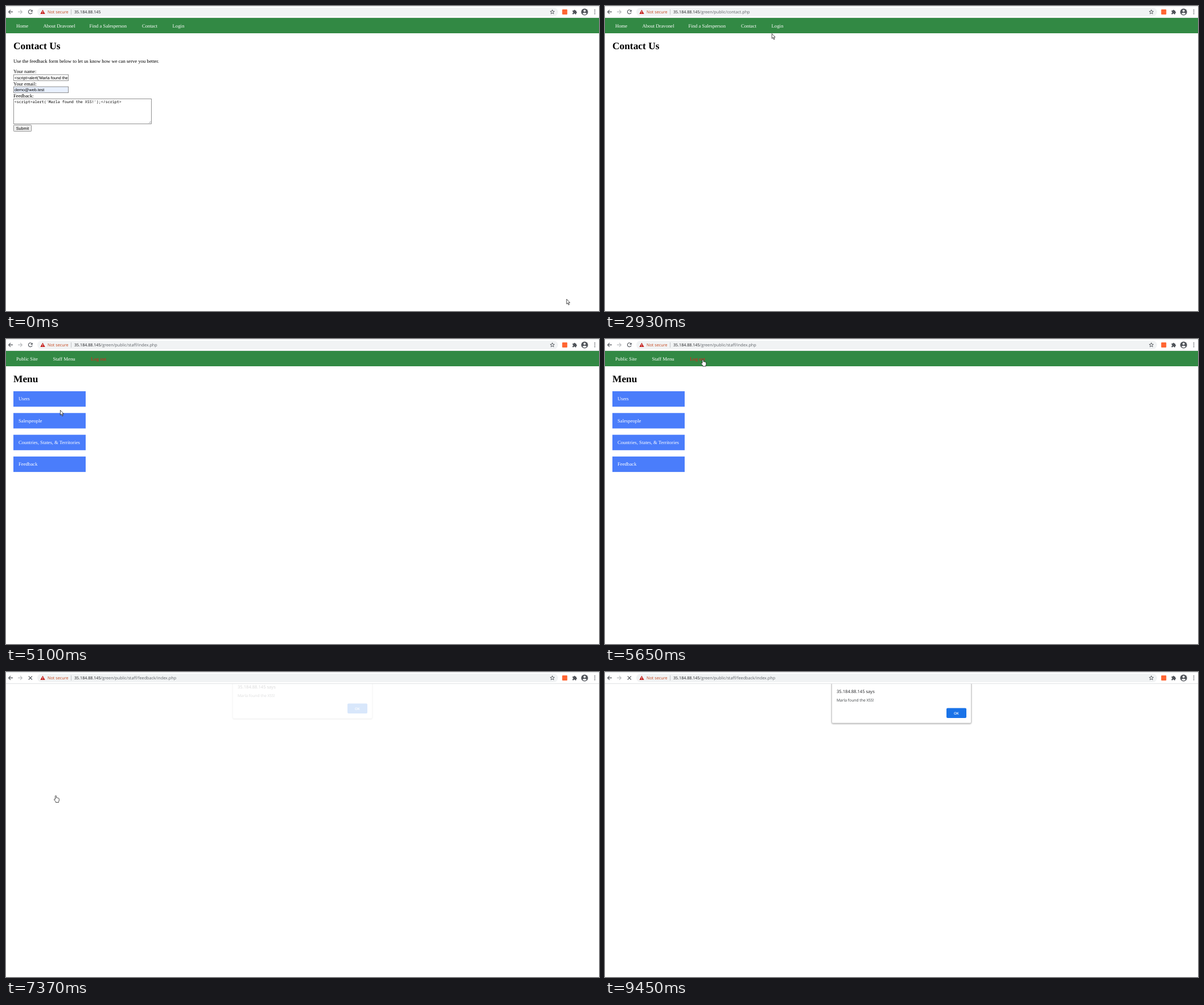
These frames come from a looping animation (1042x537 px, 9.53 s). An HTML page:

```html
<!DOCTYPE html>
<html lang="en">
<head>
<meta charset="utf-8">
<title>Feedback form demo</title>
<style>
  html, body { margin: 0; width: 100%; height: 100%; overflow: hidden; background: #fff; }
  svg { display: block; width: 1042px; height: 537px; }
  text { font: 8.68px "Liberation Serif", serif; text-rendering: geometricPrecision; white-space: pre; }
  .ui { font-family: "Open Sans", "Noto Sans", sans-serif; font-size: 7.25px; }
  .field { font: 7.24px "Liberation Sans", sans-serif; }
  .code { font: 6.68px "Noto Sans Mono", monospace; }
  .title { font-size: 17.37px; font-weight: bold; }
  .bar { fill: #328944; }
  .light text { fill: #fff; }
  .light .logout { fill: #e81c1c; }
  .icon { fill: none; stroke: #50545a; stroke-width: 1.1; }
  .solid { fill: #50545a; }
  .link { fill: none; }
  .box { fill: #fff; stroke: #767676; stroke-width: .8; }
  .autofill { fill: #e8f0fe; }
  .button { fill: #efefef; }
  .box.hover { stroke: #4f4f4f; }
  .button.hover { fill: #e3e3e3; }
  .button.pressed { fill: #f5f5f5; stroke: #8d8d8d; }
  .tile { fill: #4a7dfb; }
  .tile.hover { fill: #4070e1; }
  #ok { fill: #1a73e8; }
  #ok.hover { fill: #2b7de9; }
</style>
</head>
<body>
<svg viewBox="0 0 1042 537">
  <defs>
    <clipPath id="nameClip"><rect x="14" y="121" width="94.5" height="10"/></clipPath>
    <filter id="shadow" x="-5%" y="-10%" width="110%" height="130%">
      <feDropShadow dx="0" dy="1" stdDeviation="1.2" flood-opacity=".4"/>
    </filter>
  </defs>
  <rect width="1042" height="537" fill="#fff"/>

  <g id="contact">
    <rect class="bar" y="21" width="1042" height="27"/>
    <g class="light">
      <text x="18" y="38">Home</text>
      <text x="65.5" y="38">About Dravonel</text>
      <text x="146.5" y="38">Find a Salesperson</text>
      <text x="239" y="38">Contact</text>
      <text x="292.5" y="38">Login</text>
    </g>
    <rect class="link" data-cursor="hand" x="234" y="21" width="38" height="27"/>
    <rect class="link" data-cursor="hand" x="287" y="21" width="32" height="27"/>
    <text class="title" x="13" y="76">Contact Us</text>
    <g id="form">
      <text x="13" y="99.7">Use the feedback form below to let us know how we can serve you better.</text>
      <text x="13" y="118.3">Your name:</text>
      <rect class="box" data-cursor="beam" x="13.4" y="120.9" width="96.2" height="10.6"/>
      <text class="field" x="15" y="128.8" clip-path="url(#nameClip)">&lt;script&gt;alert('Marla found the XSS!');&lt;/script&gt;</text>
      <text x="13" y="139.6">Your email:</text>
      <rect class="box autofill" data-cursor="beam" x="13.4" y="142.1" width="96.2" height="10.6"/>
      <text class="field" x="15" y="150">demo@web.test</text>
      <text x="13" y="160.8">Feedback:</text>
      <rect class="box" data-cursor="beam" x="13.4" y="163.4" width="242.2" height="44"/>
      <path class="icon" style="stroke-width:.5" d="M251 206.3l3.6-3.6M253 206.3l1.6-1.6"/>
      <text class="code" x="14.7" y="171.3">&lt;script&gt;alert('Marla found the XSS!');&lt;/script&gt;</text>
      <rect id="submit" class="box button" data-cursor="arrow" x="13.4" y="209.6" width="31.2" height="11" rx="1"/>
      <text class="field" x="29" y="217.7" text-anchor="middle">Submit</text>
    </g>
  </g>

  <g id="staff" class="light">
    <rect class="bar" y="21" width="1042" height="27"/>
    <text x="18" y="38">Public Site</text>
    <text x="82.5" y="38">Staff Menu</text>
    <text class="logout" x="149" y="38">Log out</text>
    <rect class="link" data-cursor="hand" x="144" y="21" width="38" height="27"/>
    <text class="title" x="13" y="76" style="fill:#000">Menu</text>
  </g>

  <g id="dialog">
    <rect x="398.5" y="18.5" width="245" height="71.5" rx="2" fill="#fff" stroke="#b5b5b5" stroke-width=".6" filter="url(#shadow)"/>
    <text class="ui" x="407" y="36.6" style="font-size:7.6px" fill="#202124">35.184.88.145 says</text>
    <text class="ui" x="407" y="52" style="font-size:6.75px" fill="#3c4043">Marla found the XSS!</text>
    <rect id="ok" x="600" y="63.5" width="35" height="17.5" rx="2"/>
    <text class="ui" x="617.3" y="74.5" text-anchor="middle" style="font-size:6.2px;font-weight:600" fill="#fff">OK</text>
  </g>

  <g id="toolbar">
    <rect width="1042" height="20.5" fill="#fff"/>
    <path d="M0 .5H1042" stroke="#dfe1e4"/>
    <path d="M0 20.5H1042" stroke="#d9dbde" stroke-width=".8"/>
    <rect x="55" y="3" width="915" height="15" rx="7.5" fill="#f1f3f4"/>
    <path class="icon" d="M12 10.4H4.8M8 7L4.6 10.4 8 13.8"/>
    <path class="icon" style="stroke:#b7babd" d="M21 10.4H28.2M25 7L28.4 10.4 25 13.8"/>
    <g id="reload">
      <path class="icon" d="M45.6 8.1A3.5 3.5 0 1 0 46.2 11.4"/>
      <path class="solid" d="M46.7 6.4V10H43.1Z"/>
    </g>
    <path id="stop" class="icon" d="M39.7 7.3L45.9 13.5M45.9 7.3L39.7 13.5"/>
    <path d="M64.5 6.5L68.7 14H60.3Z" fill="#c5221f"/>
    <path d="M64.5 9V11.4M64.5 12.1V13" stroke="#fff" stroke-width=".8"/>
    <text class="ui" x="73" y="13" fill="#c5481f">Not secure</text>
    <path d="M114.5 6V15" stroke="#b5b8bc" stroke-width=".8"/>
    <text class="ui" x="120" y="13" fill="#202124" style="font-size:7.15px">35.184.88.145</text>
    <text class="ui" id="path" x="166.6" y="13" fill="#5f6368"></text>
    <path class="icon" style="stroke-width:.9" d="M960 6.7L961 9.2 963.7 9.4 961.6 11.1 962.3 13.8 960 12.3 957.7 13.8 958.4 11.1 956.3 9.4 959 9.2Z"/>
    <rect x="977.3" y="6" width="9" height="9" rx="1" fill="#ff6633"/>
    <path class="solid" d="M995.5 8H997.6A1.3 1.3 0 0 1 1000.2 8H1002V10A1.3 1.3 0 0 1 1002 12.6V14.4H999.9A1.2 1.2 0 0 0 997.5 14.4H995.5V12.3A1.2 1.2 0 0 0 995.5 9.9Z"/>
    <circle class="solid" cx="1016.7" cy="10.4" r="6"/>
    <circle cx="1016.7" cy="8.4" r="1.9" fill="#fff"/>
    <path d="M1012.9 13.3Q1016.7 10 1020.5 13.3 1016.7 17 1012.9 13.3Z" fill="#fff"/>
    <g class="solid">
      <circle cx="1034.6" cy="7.2" r=".9"/><circle cx="1034.6" cy="10.4" r=".9"/><circle cx="1034.6" cy="13.6" r=".9"/>
    </g>
  </g>

  <g id="cursor" fill="#fff" stroke="#111" stroke-width=".75" stroke-linejoin="round">
    <path id="arrow" d="M.3 .4V9L2.2 7.2 3.7 10.6 5.1 10 3.6 6.7H6.2Z"/>
    <path id="hand" d="M-1 7V1.2Q0 -.3 1 1.2V4.4Q2 3.7 2.7 4.7 3.7 4.2 4.3 5.2 5.7 4.9 5.8 6.4V9Q5.8 10.4 4.9 11.2V12.6H-.1V11.4L-2.9 7.9Q-3 6.2 -1 7Z"/>
    <path id="beam" fill="none" d="M-1.6 -4.5H-.4L0 -4 .4 -4.5H1.6M0 -4V4M-1.6 4.5H-.4L0 4 .4 4.5H1.6"/>
  </g>
</svg>
<script>
const LOOP = 9530;
const $ = id => document.getElementById(id);
const show = (id, on) => { $(id).style.display = on ? "" : "none"; };
const between = (t, a, b) => t >= a && t < b;

["Users", "Salespeople", "Countries, States, &amp; Territories", "Feedback"].forEach((label, i) => {
  const y = 92 + i * 38.3;
  $("staff").insertAdjacentHTML("beforeend",
    `<rect class="tile" data-cursor="hand" x="13" y="${y}" width="127" height="27.2"/>
     <text x="22" y="${y + 16.4}">${label}</text>`);
});

// Pointer tracks: time, x, y. The pointer is off stage between tracks.
const tracks = [
  [[0, 988, 517], [70, 760, 425], [140, 420, 280], [210, 205, 190], [520, 205, 190],
   [750, 150, 200], [950, 60, 213], [1130, 28, 217], [1210, 28, 217], [1280, 27.5, 212.5],
   [2150, 27.5, 212.5], [2300, 28.5, 214], [2400, 28.5, 214], [2620, 120, 150], [2850, 260, 65],
   [3000, 321, 34], [3160, 304, 35], [3310, 303, 33], [3940, 303, 33]],
  [[4730, -6, 187], [4870, 25, 172], [5150, 110, 115], [5400, 189, 55], [5520, 182, 37],
   [5650, 172, 35.5], [5720, 171, 37], [5800, 163, 37.5], [6050, 163, 37.5], [6120, 157, 38],
   [6200, 154, 38], [6360, 154, 38], [6500, 130, 90], [6650, 97, 180], [6730, 87.5, 212],
   [6810, 87.5, 217], [7770, 87.5, 217], [7920, 250, 290], [8130, 740, 470], [8270, 922, 521],
   [8420, 850, 380], [8600, 690, 160], [8760, 612, 69], [8840, 650, 125], [9000, 880, 390],
   [9080, 1003, 522], [9150, 1012, 540]]
];

function pointerAt(t) {
  const track = tracks.find(p => between(t, p[0][0], p.at(-1)[0]));
  if (!track) return null;
  const i = track.findIndex(p => p[0] > t);
  const [t0, x0, y0] = track[i - 1], [t1, x1, y1] = track[i];
  const k = (t - t0) / (t1 - t0);
  return { x: x0 + (x1 - x0) * k, y: y0 + (y1 - y0) * k };
}

function contains(rect, p) {
  const [x, y, w, h] = ["x", "y", "width", "height"].map(a => +rect.getAttribute(a));
  return between(p.x, x, x + w) && between(p.y, y, y + h);
}

const zones = [...document.querySelectorAll("[data-cursor]")];

function render(t) {
  const formOpen = t < 2150, onContact = t < 3940, onStaff = between(t, 3940, 7370);
  show("contact", onContact);
  show("form", formOpen);
  show("staff", onStaff);

  const loading = between(t, 1600, 2150) || between(t, 3390, 3940) || t >= 7130;
  show("reload", !loading);
  show("stop", loading);
  $("path").textContent = formOpen ? "" : "/green/public/" +
    (onContact ? "contact.php" : onStaff ? "staff/index.php" : "staff/feedback/index.php");

  const opening = Math.min(1, .16 + Math.max(0, t - 7370) / 150 * .84);
  show("dialog", t >= 7370);
  $("dialog").setAttribute("opacity", opening);
  $("dialog").setAttribute("transform", `translate(0 ${-8 * (1 - opening) / .84})`);
  $("ok").classList.toggle("hover", between(t, 8700, 9450));

  const p = pointerAt(t);
  let shape = between(t, 7370, 7840) ? "hand" : "arrow";
  for (const zone of zones) {
    const active = zone.closest("#staff") ? onStaff : zone.closest("#form") ? formOpen : onContact;
    const hit = Boolean(active && p && contains(zone, p));
    zone.classList.toggle("hover", hit);
    if (hit) shape = zone.dataset.cursor;
  }
  $("submit").classList.toggle("pressed", between(t, 1450, 1600));

  show("cursor", p);
  if (p) $("cursor").setAttribute("transform", `translate(${p.x} ${p.y})`);
  for (const name of ["arrow", "hand", "beam"]) show(name, name === shape);
}

const start = performance.now();
function tick() {
  render((performance.now() - start) % LOOP);
  requestAnimationFrame(tick);
}
tick();
</script>
</body>
</html>
```
